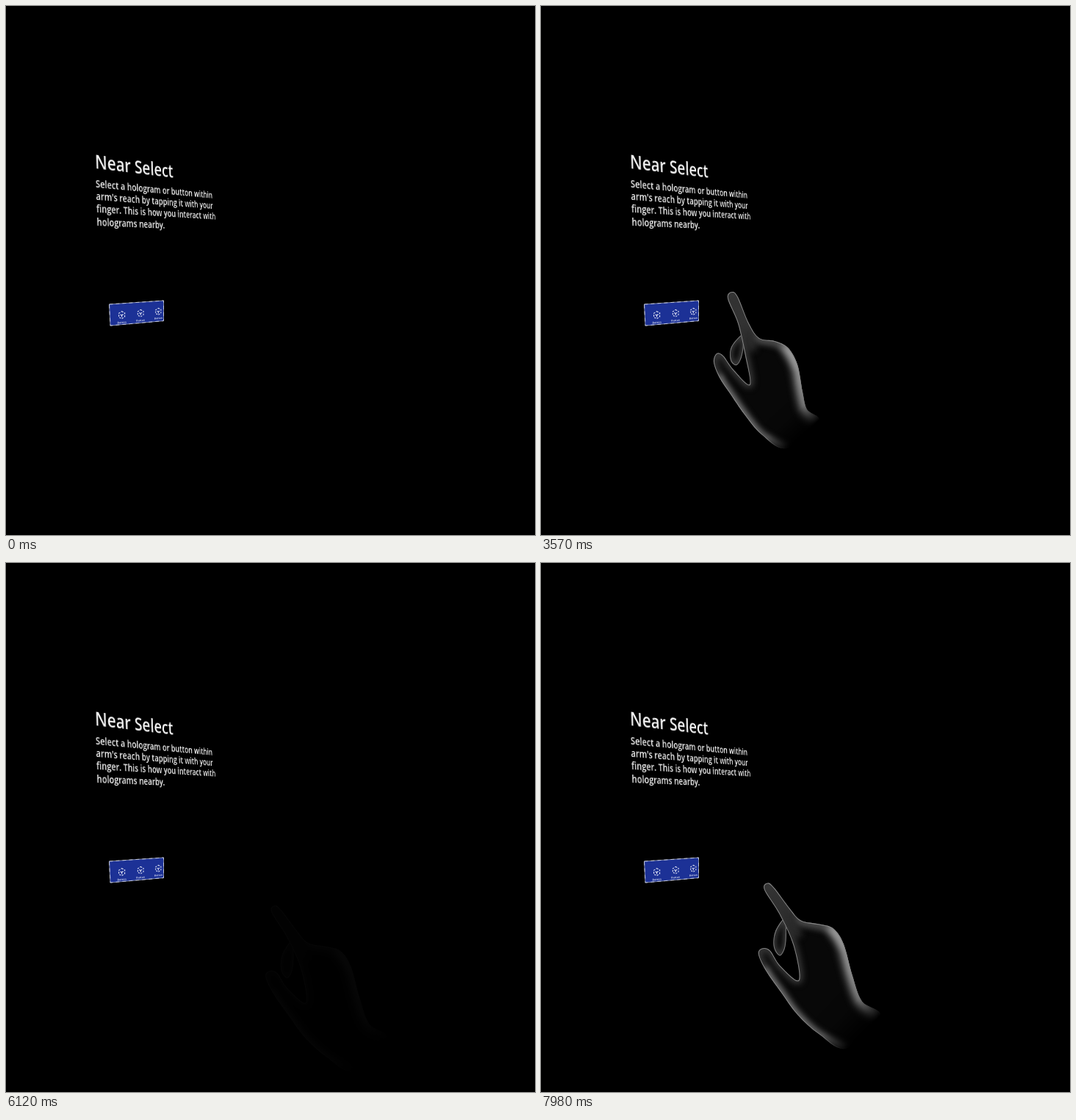
Recreate the animation shown at these times as an HTML page with a canvas. Size 720 by 720 pixels, loop 8 s.

```html
<!DOCTYPE html>
<html lang="en">
<head>
<meta charset="utf-8">
<title>Near Select</title>
<style>
  html, body { margin: 0; width: 100%; height: 100%; overflow: hidden; background: #000; }
  #stage { position: relative; width: 720px; height: 720px; overflow: hidden; background: #000; }
  #stage > * { position: absolute; left: 0; top: 0; }
  #plane { height: 78px; transform-origin: 0 0; color: #f2f2f2; white-space: pre;
           font-family: "Open Sans", "Noto Sans", sans-serif; font-weight: 600; }
  #plane > * { position: absolute; left: 0; margin: 0; }
  h1 { top: -25.5px; font-size: 27px; line-height: 30px; font-weight: 600; }
  p { top: 11.9px; font-size: 14px; line-height: 17.3px; }
  canvas { mix-blend-mode: screen; }
</style>
</head>
<body>
<div id="stage">
  <div id="plane"><h1>Near Select</h1><p>Select a hologram or button within
arm's reach by tapping it with your
finger. This is how you interact with
holograms nearby.</p></div>
  <svg width="720" height="720" viewBox="0 0 720 720">
    <defs>
      <g id="item">
        <g fill="none" stroke="#e6e9f8" stroke-width="1.1" stroke-dasharray="2.4 1.6">
          <path d="M0-5L4-2.6V2.6L0 5L-4 2.6V-2.6Z"/>
          <path d="M0 .4V4M0 .4L-3.2-1.6M0 .4L3.2-1.6"/>
        </g>
        <text y="11.4" text-anchor="middle" font-size="3.7" font-weight="600" fill="#e6e9f8"
              font-family="Open Sans, Noto Sans, sans-serif">Button</text>
      </g>
    </defs>
    <path d="M140.5 406L214.5 401V428.5L142 435Z" fill="#1c3196" stroke="#8f98bd" stroke-width=".9"/>
    <path d="M140.5 406L214.5 401V428.5L142 435Z" fill="none" stroke="#d5d9e8" stroke-width=".8" stroke-dasharray="5 4"/>
    <use href="#item" transform="translate(157.6 420.6) skewY(-4.5)"/>
    <use href="#item" transform="translate(183.2 418.2) skewY(-4.5) scale(.96)"/>
    <use href="#item" transform="translate(207.3 415.8) skewY(-4.5) scale(.9)"/>
  </svg>
  <canvas width="720" height="720"></canvas>
</div>
<script>
const LOOP = 8000, FRAME = 30, REPEAT = 3365;

// Lays the text block on a plane seen at an angle.
function project(el, w, h, [[x0, y0], [x1, y1], [x2, y2], [x3, y3]]) {
  const ax = x1 - x2, bx = x3 - x2, sx = x0 - x1 + x2 - x3;
  const ay = y1 - y2, by = y3 - y2, sy = y0 - y1 + y2 - y3;
  const det = ax * by - bx * ay;
  const g = (sx * by - bx * sy) / det, k = (ax * sy - sx * ay) / det;
  el.style.transform = `matrix3d(${[
    (x1 - x0 + g * x1) / w, (y1 - y0 + g * y1) / w, 0, g / w,
    (x3 - x0 + k * x3) / h, (y3 - y0 + k * y3) / h, 0, k / h,
    0, 0, 1, 0, x0, y0, 0, 1].map(n => n.toFixed(8))})`;
}
project(document.getElementById('plane'), document.querySelector('p').offsetWidth, 78,
  [[121.3, 221], [283, 240.4], [286.5, 305.8], [123.7, 299]]);

// Hand outline from heel, round thumb and index, over the knuckles to the wrist;
// the last six points are the curled finger.
const parse = s => s.split(' ').map(p => p.split(',').map(Number));
const POSES = {
  raised: parse('334,602 300,583 277,556 257,527 243,506 235,485 239,473 248,476 262,495 284,515 ' +
    '278,476 268,432 254,398 260,389 268,396 283,432 297,452 318,456 336,465 349,488 356,525 362,549 378,566 ' +
    '274,447 259,464 258,482 266,489 273,478 276,458'),
  tap: parse('288,577 255,566 230,549 208,527 190,511 177,499 181,490 192,491 205,503 224,508 ' +
    '216,480 197,455 169,429 172,419 182,422 202,444 218,456 245,456 262,460 278,476 293,502 305,522 327,538 ' +
    '199,462 196,482 204,500 214,504 218,494 212,478'),
  away: parse('422,664 385,645 355,618 333,588 312,558 302,536 307,528 318,531 332,552 357,571 ' +
    '350,525 331,482 310,448 315,439 324,446 345,474 360,490 385,495 404,501 418,522 430,565 443,600 468,621 ' +
    '338,487 325,505 323,526 331,538 338,528 340,508')
};

// time, pose, shift x, shift y, opacity, touch glow
const STEPS = [
  [2730, 'away', 52, 28, 0, 0],
  [3000, 'away', 44, 20, .45, 0],
  [3360, 'away', 11, -3, .9, 0],
  [3570, 'raised', 0, 0, 1, 0],
  [3840, 'tap', 0, 0, 1, .45],
  [3930, 'tap', -2, 1, 1, .45],
  [4340, 'away', -50, -38, 1, 0],
  [4610, 'away', -7, -4, 1, 0],
  [4650, 'away', 0, 0, .92, 0],
  [4950, 'away', 34, 23, .35, 0],
  [5130, 'away', 35, 24, 0, 0]
].map(([time, pose, dx, dy, alpha, touch]) =>
  ({ time, alpha, touch, points: POSES[pose].map(([x, y]) => [x + dx, y + dy]) }));

function handAt(time) {
  const i = STEPS.findIndex((s, n) => n < STEPS.length - 1 && time >= s.time && time < STEPS[n + 1].time);
  if (i < 0) return null;
  const a = STEPS[i], b = STEPS[i + 1], p = STEPS[i - 1] || a, q = STEPS[i + 2] || b;
  const span = b.time - a.time, u = (time - a.time) / span;
  const ka = span / (b.time - p.time), kb = span / (q.time - a.time);
  const curve = (vp, va, vb, vq) =>
    va * (2 * u ** 3 - 3 * u * u + 1) + vb * (3 * u * u - 2 * u ** 3) +
    (vb - vp) * ka * (u ** 3 - 2 * u * u + u) + (vq - va) * kb * (u ** 3 - u * u);
  return {
    alpha: a.alpha + (b.alpha - a.alpha) * u,
    touch: a.touch + (b.touch - a.touch) * u,
    points: a.points.map((pt, n) => pt.map((v, c) =>
      curve(p.points[n][c], v, b.points[n][c], q.points[n][c])))
  };
}

function smooth(pts, closed) {
  const path = new Path2D(), n = pts.length;
  const at = i => closed ? pts[(i + n) % n] : pts[Math.max(0, Math.min(n - 1, i))];
  path.moveTo(...pts[0]);
  for (let i = 0; i < (closed ? n : n - 1); i++) {
    const [p, a, b, q] = [at(i - 1), at(i), at(i + 1), at(i + 2)];
    path.bezierCurveTo(a[0] + (b[0] - p[0]) / 6, a[1] + (b[1] - p[1]) / 6,
      b[0] - (q[0] - a[0]) / 6, b[1] - (q[1] - a[1]) / 6, b[0], b[1]);
  }
  if (closed) path.closePath();
  return path;
}

const ctx = document.querySelector('canvas').getContext('2d');
const middle = (a, b) => [(a[0] + b[0]) / 2, (a[1] + b[1]) / 2];

function glow(path, color, width, blur) {
  ctx.filter = `blur(${blur}px)`;
  ctx.strokeStyle = color;
  ctx.lineWidth = width;
  ctx.stroke(path);
  ctx.filter = 'none';
}

function shape(path, paint) {
  ctx.save();
  ctx.clip(path);
  ctx.fillStyle = '#080808';
  ctx.fill(path);
  paint();
  ctx.restore();
}

function drawHand({ points, alpha, touch }) {
  const body = points.slice(0, 23);
  const outline = smooth(body, true), curled = smooth(points.slice(23), true);
  const tip = middle(body[12], body[14]);
  ctx.lineCap = ctx.lineJoin = 'round';

  shape(curled, () => {
    glow(curled, '#3a3a3a', 8, 3);
    glow(curled, '#7c7c7c', 2, .6);
  });
  shape(outline, () => {
    const finger = smooth([tip, middle(body[11], body[15]), middle(body[10], body[16])], false);
    glow(finger, '#2b2b2b', 13, 4);
    glow(smooth(body.slice(4, 19), false), '#3c3c3c', 9, 4);
    glow(smooth(body.slice(16, 20), false), '#4a4a4a', 13, 5);
    glow(smooth(body.slice(18), false), '#a8a8a8', 15, 6);
    glow(smooth(body.slice(0, 5), false), '#8c8c8c', 8, 4);
    glow(outline, '#858585', 2, .7);
    if (touch > 0) {
      const shine = ctx.createRadialGradient(...tip, 0, ...tip, 26);
      shine.addColorStop(0, `rgba(190,200,255,${touch})`);
      shine.addColorStop(1, 'rgba(190,200,255,0)');
      ctx.fillStyle = shine;
      ctx.fill(outline);
    }
  });

  // The forearm dissolves into the dark.
  const fade = ctx.createLinearGradient(...middle(body[2], body[20]), ...middle(body[0], body[22]));
  fade.addColorStop(0, `rgba(0,0,0,${alpha})`);
  fade.addColorStop(.5, `rgba(0,0,0,${alpha * .85})`);
  fade.addColorStop(1, 'rgba(0,0,0,0)');
  ctx.globalCompositeOperation = 'destination-in';
  ctx.fillStyle = fade;
  ctx.fillRect(0, 0, 720, 720);
  ctx.globalCompositeOperation = 'source-over';
}

const start = performance.now();
function tick() {
  const now = Math.max(0, performance.now() - start) % LOOP;
  const time = Math.floor(now / FRAME) * FRAME;
  const hand = handAt(time) || handAt(time - REPEAT);
  ctx.clearRect(0, 0, 720, 720);
  if (hand) drawHand(hand);
  requestAnimationFrame(tick);
}
tick();
</script>
</body>
</html>
```
